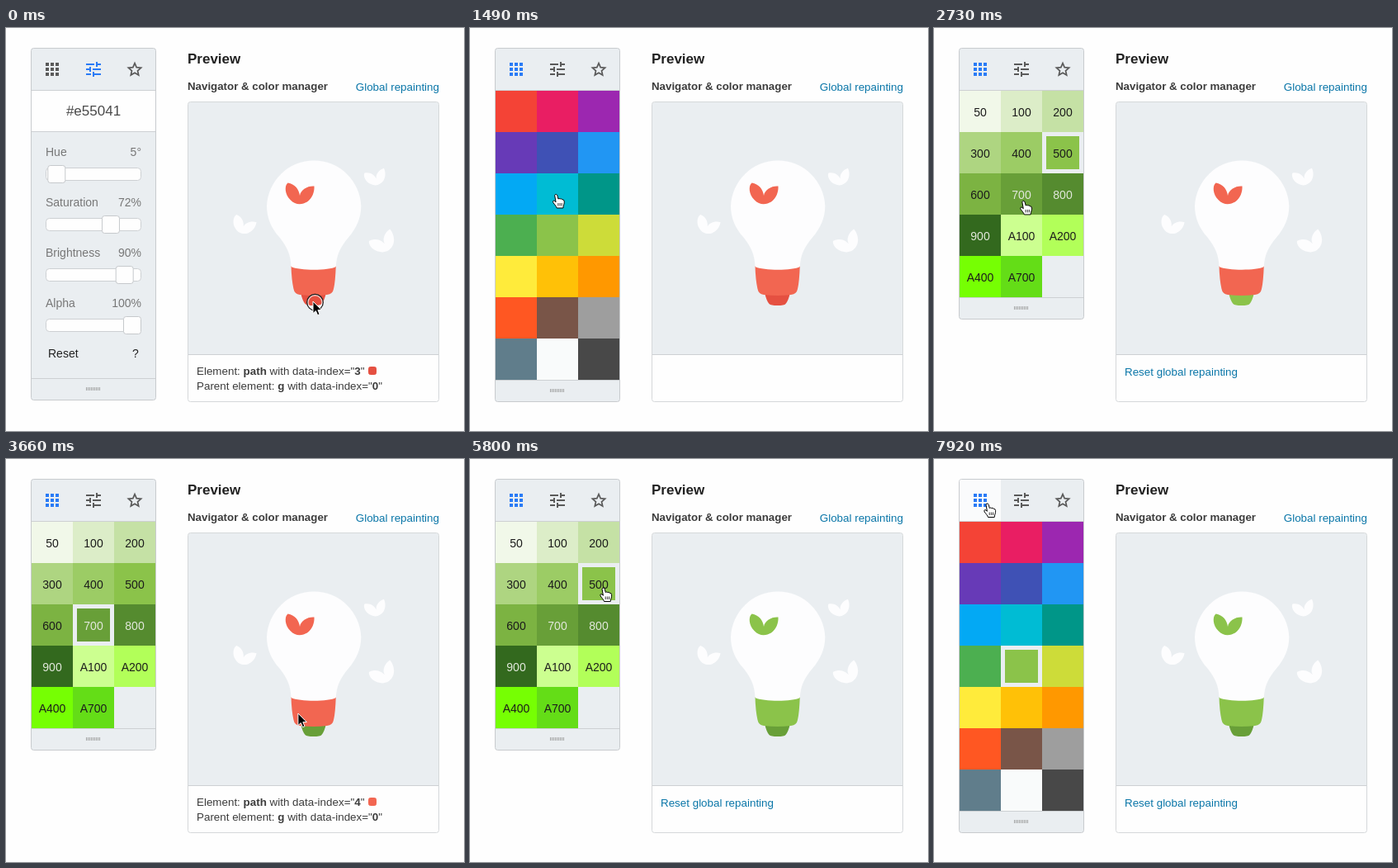
Recreate the animation shown at these times as an HTML page. Size 555 by 488 pixels, loop 8000 ms.

```html
<!DOCTYPE html>
<html lang="en">
<head>
<meta charset="utf-8">
<title>Color manager</title>
<style>
  html, body { margin: 0; width: 100%; height: 100%; overflow: hidden; background: #fefefe; }
  svg { display: block; width: 555px; height: 488px; font: 14px "Liberation Sans", Arial, sans-serif; }
  .line { fill: none; stroke: #cdd0d3; }
  .link { fill: #0a76a8; font-size: 13.4px; }
  .info { fill: #3c3c3c; font-size: 13.4px; }
  .label { fill: #777; }
  .mid { text-anchor: middle; }
  .end { text-anchor: end; }
  .bold { font-weight: bold; }
</style>
</head>
<body>
<svg id="stage" viewBox="0 0 555 488">
  <defs>
    <clipPath id="inner"><rect x="31" y="76" width="150" height="377"/></clipPath>
  </defs>
  <rect width="555" height="488" fill="#fefefe"/>

  <text x="220" y="43" class="bold" font-size="17" fill="#222">Preview</text>
  <text x="220" y="75" class="bold" font-size="13.3" fill="#3c3c3c">Navigator &amp; color manager</text>
  <text x="525" y="76" class="link end">Global repainting</text>
  <path d="M221 395V92q0-2 2-2h299q2 0 2 2v303z" fill="#eaeef1"/>
  <path d="M221 395.5h303" class="line"/>
  <rect x="220.5" y="89.5" width="304" height="363" rx="3" class="line" style="stroke:#d5d8da"/>

  <g id="art" fill="#fdfdfe">
    <path id="base" data-index="3" d="M357 320H388Q386 330 382.5 334 381 336 372.5 336 364.500 336 362.5 334 359 330 357 320Z"/>
    <path id="cap" data-index="4" d="M345.5 288Q372 293 399.8 288 399 308 397 316 396 322 389 323 373 325 356 323 349.5 322 348.5 316 346 305 345.500 288Z"/>
    <path id="bulb" data-index="2" d="M316 215.500A57.2 57.500 0 0 1 430.3 215.500C430.3 231 424 243 415.500 253 406 264 400.5 274 399.8 289 391 294 356 294 345.5 289 345 274 340 264 331 253 322 243 316 231 316 215.500Z"/>
    <path id="leaf" data-index="5" d="M356 203C355 195 350 189 341.5 187.5 337 191 338 202 344.500 208 351 215 359 214 365 210.500 371 206 374 199 373.500 191.500 365 191 357 196 356 203Z"/>
  </g>

  <text id="reset" x="231" y="421" class="link">Reset global repainting</text>
  <g id="info" class="info">
    <text x="231" y="420">Element: <tspan class="bold">path</tspan> with data-index="<tspan id="index" class="bold">3</tspan>"</text>
    <rect id="chip" x="439.5" y="410.5" width="9" height="9" rx="2"/>
    <text x="231" y="438">Parent element: <tspan class="bold">g</tspan> with data-index="<tspan class="bold">0</tspan>"</text>
  </g>

  <rect id="panel" x="30.5" y="24.5" width="151" height="426" rx="3" fill="#eaeef1" stroke="#c8cbce"/>
  <path id="tab" d="M31 75V27q0-2 2-2h48v50z" fill="#fafbfc"/>
  <path d="M31 75.5h150" class="line"/>
  <g id="gridIcon"></g>
  <path id="tuneIcon" transform="translate(94 38)" fill="none" stroke-width="2" d="M3 6h10m2 0h6m-5-3v6M3 12h6m2 0h10M8 9v6m-5 3h6m2 0h10m-9-3v6"/>
  <polygon id="star" transform="translate(156 50.6)" fill="none" stroke="#5a5a5a" stroke-width="1.7"/>
  <g clip-path="url(#inner)">
    <g id="tuner">
      <rect x="31" y="76" width="150" height="49" fill="#fefefe"/>
      <path d="M31 125.5h150" class="line"/>
      <text x="106" y="106" class="mid" font-size="17" fill="#4a4a4a">#e55041</text>
      <g id="sliders"></g>
    </g>
    <g id="mainGrid"></g>
    <g id="shadeGrid"></g>
  </g>
  <g id="footer"></g>

  <g id="ring" fill="none">
    <circle r="9" stroke="#fff" stroke-opacity=".7" stroke-width="2.4"/>
    <circle r="9.8" stroke="#1c1c1c" stroke-width="1.3"/>
  </g>
  <path id="arrow" d="M0 0V14.600L3.400 11.500 5.600 16.700 8.100 15.600 5.900 10.600H10.500Z" fill="#000" stroke="#fff"/>
  <g id="hand" stroke="#000" stroke-linejoin="round">
    <path fill="#fff" d="M-2 1.300Q-1.600-.4 0 0 1 .3 1.300 1.600L2.300 5.500Q3.500 4.500 4.800 5.500 6.100 4.800 7.200 6.200 9.400 6 9.600 8.600C9.900 11 8.500 13 8.200 16.500H.5C0 14.500-2 12.500-3.800 10-4.800 8-3.400 7-2 8L-.6 9.300Z"/>
    <path fill="none" stroke-width=".8" d="M2.200 10.500v3.500M4.400 10.500v3.500M6.500 10.500v3.500"/>
  </g>
</svg>
<script>
const $ = id => document.getElementById(id);
const LOOP = 8000;
const BLUE = '#2a7bf6', GREY = '#5a5a5a', WHITE = '#fdfdfe';
const RED = '#e55041', CORAL = '#f26651', GREEN = '#8bc34a', DARK_GREEN = '#689f38';

const MAIN = ('f44336 e91e63 9c27b0 673ab7 3f51b5 2196f3 03a9f4 00bcd4 009688 4caf50 8bc34a ' +
  'cddc39 ffeb3b ffc107 ff9800 ff5722 795548 9e9e9e 607d8b f9fbfb 484848').split(' ');
const SHADES = ('f1f8e9 dcedc8 c5e1a5 aed581 9ccc65 8bc34a 7cb342 689f38 558b2f 33691e ' +
  'ccff90 b2ff59 76ff03 64dd17').split(' ');
const NAMES = '50 100 200 300 400 500 600 700 800 900 A100 A200 A400 A700'.split(' ');

// When the pointer presses something
const OPEN_GRID = 990, PICK_GREEN = 1920, PICK_700 = 3050, PICK_500 = 5120, BACK = 7800;

const HOME = { x: 372, y: 331 };
const MOVES = [
  { from: 20, to: 720, x: 50, y: 55 },
  { from: 1130, to: 1740, x: 122, y: 248 },
  { from: 2510, to: 2850, x: 106, y: 201 },
  { from: 3100, to: 3840, x: 377, y: 318 },
  { from: 4310, to: 5100, x: 162, y: 156, sag: 48 },
  { from: 5800, to: 6500, x: 340, y: 241 },
  { from: 7000, to: 7590, x: 65, y: 54, sag: 20 }
];

const times = (n, f) => Array.from({ length: n }, (_, i) => f(i));
const cellAt = i => [31 + i % 3 * 50, 76 + Math.floor(i / 3) * 50];

function drawGrid(id, colors, names = []) {
  $(id).innerHTML = colors.map((color, i) => {
    const [x, y] = cellAt(i), name = names[i] || '';
    const ink = ['700', '800', '900'].includes(name) ? '#e2e8dc' : '#1c1c1c';
    return `<rect x="${x}" y="${y}" width="50" height="50" fill="#${color}" shape-rendering="crispEdges"/>
      <text x="${x + 25}" y="${y + 31}" class="mid" fill="${ink}">${name}</text>`;
  }).join('') + `<rect id="${id}Pick" width="45" height="45" fill="none" stroke="#eaeef1" stroke-width="5"/>`;
}

function pick(id, i) {
  const [x, y] = cellAt(i);
  move(id + 'Pick', x + 2.5, y + 2.5);
}

function drawSlider([name, value, share], i) {
  const y = i * 61;
  return `<text x="48" y="${155 + y}" class="label">${name}</text>
    <text x="164" y="${155 + y}" class="label end">${value}</text>
    <rect x="48.5" y="${169.5 + y}" width="115" height="15" rx="4" fill="#fefefe" stroke="#cdd0d3"/>
    <rect x="${49.5 + 93 * share}" y="${166.5 + y}" width="21" height="21" rx="3" fill="#fefefe" stroke="#c6c9cc"/>`;
}

// A white copy of the leaf, its left tip at x, y
function whiteLeaf(x, y, turn, size) {
  const copy = $('leaf').cloneNode();
  copy.removeAttribute('id');
  copy.setAttribute('transform', `translate(${x} ${y}) rotate(${turn}) scale(${size}) translate(-341.5 -187.5)`);
  $('art').append(copy);
}

function build() {
  whiteLeaf(279.5, 226, 14, 0.8);
  whiteLeaf(434.5, 175.5, -21, 0.75);
  whiteLeaf(440, 258, -37, 0.9);
  drawGrid('mainGrid', MAIN);
  drawGrid('shadeGrid', SHADES, NAMES);
  pick('mainGrid', 10);
  $('gridIcon').innerHTML = times(9, i =>
    `<rect x="${48 + i % 3 * 6}" y="${42 + Math.floor(i / 3) * 6}" width="4" height="4"/>`).join('');
  $('star').setAttribute('points', times(10, i => {
    const r = i % 2 ? 3.7 : 8, a = i * Math.PI / 5;
    return [r * Math.sin(a), -r * Math.cos(a)];
  }).join(' '));
  const rows = [['Hue', '5°', 5 / 360], ['Saturation', '72%', 0.72], ['Brightness', '90%', 0.9], ['Alpha', '100%', 1]];
  $('sliders').innerHTML = rows.map(drawSlider).join('') +
    '<text x="51" y="399" fill="#222">Reset</text><text x="153" y="399" fill="#222">?</text>';
  const grip = times(9, i => `M${97.5 + i * 2} -16v4`).join('');
  $('footer').innerHTML = `<path d="M31 -26.5h150" class="line"/><path d="${grip}" stroke="#999" stroke-width=".9"/>`;
}

const progress = (t, from, to) => Math.min(1, Math.max(0, (t - from) / (to - from)));
const swing = u => 0.5 - Math.cos(Math.PI * u) / 2;
const fade = (t, from) => swing(progress(t, from, from + 290));

function mix(a, b, k) {
  const part = (c, i) => parseInt(c.slice(1 + i * 2, 3 + i * 2), 16);
  return `rgb(${times(3, i => Math.round(part(a, i) + (part(b, i) - part(a, i)) * k))})`;
}

// Quick start, soft stop; sag bends the way downwards
function pointer(t) {
  let { x, y } = HOME;
  for (const m of MOVES) {
    const s = swing(progress(t, m.from, m.to) ** 0.75);
    x += (m.x - x) * s;
    y += (m.y - y) * s + (m.sag || 0) * 4 * s * (1 - s);
  }
  return { x, y };
}

function partAt(x, y) {
  const point = $('stage').createSVGPoint();
  point.x = x;
  point.y = y;
  return ['leaf', 'bulb', 'cap', 'base'].map($).find(part => part.isPointInFill(point));
}

const show = (id, on) => $(id).setAttribute('display', on ? 'inline' : 'none');
const move = (id, x, y) => $(id).setAttribute('transform', `translate(${x.toFixed(2)} ${y.toFixed(2)})`);
const paint = (id, color, kind = 'fill') => $(id).setAttribute(kind, color);

function drawPanel(t, tuning, shades, bottom) {
  const slide = 150 * swing(progress(t, OPEN_GRID, OPEN_GRID + 350));
  $('panel').setAttribute('height', bottom - 25);
  move('footer', 0, bottom);
  move('tuner', slide, 0);
  move('mainGrid', slide - 150, 0);
  show('tuner', slide < 150);
  show('sliders', tuning);
  show('mainGrid', !tuning && !shades);
  show('shadeGrid', shades);
  show('mainGridPick', t >= PICK_GREEN);
  pick('shadeGrid', t >= PICK_700 && t < PICK_500 ? 7 : 5);
  paint('gridIcon', tuning ? GREY : BLUE);
  paint('tuneIcon', tuning ? BLUE : GREY, 'stroke');
}

function drawArt(t) {
  paint('base', t < PICK_700 ? mix(RED, GREEN, fade(t, PICK_GREEN)) : mix(GREEN, DARK_GREEN, fade(t, PICK_700)));
  const coral = mix(CORAL, GREEN, fade(t, PICK_500));
  paint('cap', coral);
  paint('leaf', coral);
}

function drawInfo(t, part) {
  show('info', part);
  show('reset', !part && t >= PICK_GREEN);
  if (!part) return;
  const color = part.getAttribute('fill');
  $('index').textContent = part.dataset.index;
  paint('chip', color || WHITE);
  paint('chip', color || '#d5d5d5', 'stroke');
}

function render(t) {
  const { x, y } = pointer(t);
  const tuning = t < OPEN_GRID;
  const shades = t >= PICK_GREEN && t < BACK;
  const bottom = tuning ? 451 : shades ? 353 : 453;
  drawPanel(t, tuning, shades, bottom);
  drawArt(t);
  drawInfo(t, partAt(x, y));

  const onPanel = x > 30 && x < 182 && y > 24;
  const hand = onPanel && (y < 75 || (!tuning && y < bottom - 26));
  show('tab', onPanel && x < 81 && y < 75);
  show('hand', hand);
  show('arrow', !hand);
  show('ring', t < 20 || (t >= 3900 && t < 3980) || (t >= 6650 && t < 6770));
  move('hand', x, y);
  move('arrow', x, y);
  move('ring', x + 2.5, y + 1.2);
}

build();
let start;
function tick(now) {
  start ??= now;
  render((now - start) % LOOP);
  requestAnimationFrame(tick);
}
render(0);
requestAnimationFrame(tick);
</script>
</body>
</html>
```
